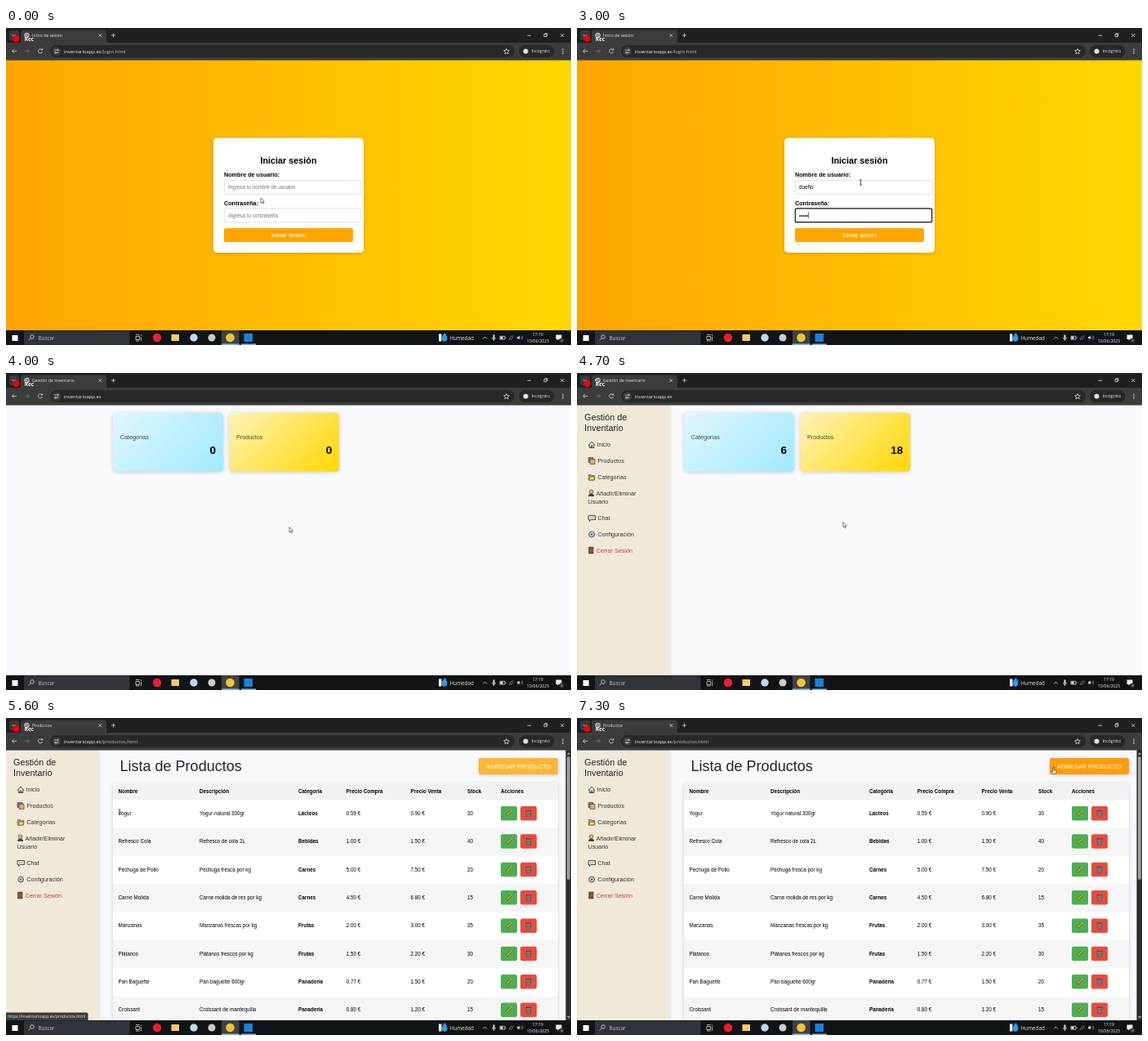
Recreate the animation shown at these times as an HTML page. Size 692x388 px, loop 8 s.

```html
<!DOCTYPE html>
<html lang="es">
<head>
<meta charset="utf-8">
<title>Inventario</title>
<style>
  html, body { margin: 0; width: 100%; height: 100%; overflow: hidden; background: #111; }
  svg { display: block; width: 100vw; height: 100vh; }
  text { white-space: pre; }
  .page text { font-family: "Liberation Sans", Arial, sans-serif; font-size: 7.21px; }
  .page .small { font-size: 6.31px; }
  .page .h2 { font-size: 10.81px; }
  .page .h1 { font-size: 18.02px; }
  .page .count { font-size: 13.5px; font-weight: 700; text-anchor: end; }
  .bold { font-weight: 700; }
  .mid { text-anchor: middle; }
  .ui text { font-family: "Open Sans", "Noto Sans", sans-serif; font-size: 5.15px; fill: #e8e8e8; }
  .ui .url { font-size: 5.9px; }
  .ui .bar { font-size: 6.3px; }
  .line { fill: none; stroke: #d8d8d8; stroke-width: .8; }
  .ink { fill: none; stroke: #222; stroke-width: .8; }
  .shadow { filter: drop-shadow(0 1.5px 2px rgba(0, 0, 0, .18)); }
</style>
</head>
<body>
<svg viewBox="0 0 692 388" preserveAspectRatio="none">
  <defs>
    <linearGradient id="gold"><stop stop-color="#ffa500"/><stop offset="1" stop-color="#ffd700"/></linearGradient>
    <linearGradient id="blueCard" gradientUnits="userSpaceOnUse" x1="146" y1="33" x2="250" y2="137">
      <stop stop-color="#e0f7ff"/><stop offset="1" stop-color="#a0e9ff"/></linearGradient>
    <linearGradient id="goldCard" gradientUnits="userSpaceOnUse" x1="289" y1="33" x2="393" y2="137">
      <stop stop-color="#fff3b8"/><stop offset="1" stop-color="#ffd700"/></linearGradient>
    <g id="edit">
      <rect width="20" height="17.5" rx="2" fill="#4caf50"/>
      <path d="M7 11.5 12 6.2" stroke="#5b4526" stroke-width="2.6"/>
      <path d="M7.3 11.2 11.6 6.6" stroke="#f0b429" stroke-width="1.4"/>
      <path d="M11.8 6.4 12.8 5.4" stroke="#e88a8a" stroke-width="2"/>
    </g>
    <g id="drop">
      <rect width="20" height="17.5" rx="2" fill="#e74c3c"/>
      <path d="M7 6h6l-.7 7H7.700z" fill="#8a9299" stroke="#3d4246" stroke-width=".6"/>
      <path d="M6.500 5.500h7M9 7v5M11 7v5" stroke="#3d4246" stroke-width=".7"/>
    </g>
  </defs>

  <g class="page" data-at="0 4000">
    <rect y="39" width="692" height="332" fill="url(#gold)"/>
    <rect class="shadow" x="254" y="134.500" width="184" height="140.500" rx="4.500" fill="#fff"/>
    <text class="h2 bold mid" x="346" y="166.300">Iniciar sesión</text>
    <text class="bold" x="267" y="182.300">Nombre de usuario:</text>
    <text class="bold" x="267" y="216.700">Contraseña:</text>
    <g id="user"></g>
    <g id="pass"></g>
    <rect x="267" y="245" width="158" height="17" rx="2" fill="#ffa500"/>
    <text class="mid" x="346" y="255.800" fill="#fff">Iniciar sesión</text>
  </g>

  <g class="page" data-at="4000 8000">
    <rect y="39" width="692" height="332" fill="#f7f9fd"/>
    <g data-at="4000 5500">
      <rect class="shadow" x="131" y="48.500" width="135" height="72" rx="4.500" fill="url(#blueCard)"/>
      <rect class="shadow" x="273.500" y="48.500" width="134.500" height="72" rx="4.500" fill="url(#goldCard)"/>
      <text x="139.700" y="81.200" fill="#444">Categorías</text>
      <text x="282" y="81.200" fill="#444">Productos</text>
      <text class="count" x="257" y="99" id="categories"></text>
      <text class="count" x="399.300" y="99" id="products"></text>
    </g>
    <g data-at="5500 8000">
      <text class="h1" x="139.500" y="65" fill="#212529">Lista de Productos</text>
      <rect class="shadow" id="add" x="579" y="49" width="97" height="20" rx="2"/>
      <text class="mid" x="627.500" y="61.500" fill="#fff">AGREGAR PRODUCTO</text>
      <rect class="shadow" x="131" y="79.500" width="545" height="300" fill="#fff"/>
      <rect x="131" y="79.500" width="545" height="21" fill="#f1f3f2"/>
      <g id="table"></g>
      <rect x="685.500" y="39" width="6.500" height="332" fill="#2c2c2c"/>
      <rect x="687" y="47" width="3.800" height="151" rx="1.900" fill="#9f9f9f"/>
      <path d="M687 45h4l-2-3zM687 365h4l-2 3z" fill="#9f9f9f"/>
    </g>
    <g data-at="4100 8000">
      <rect class="shadow" y="39" width="113" height="332" fill="#f0e9d7"/>
      <text class="h2" x="9" y="58" fill="#212529">Gestión de</text>
      <text class="h2" x="9" y="71" fill="#212529">Inventario</text>
      <rect data-at="5100 5500" x="9" y="97.500" width="95" height="19.500" rx="2" fill="#ffba0a"/>
      <g id="menu" fill="#333"></g>
      <path class="ink" d="M14 88.500 18 84l4 4.500M15.200 87.500v4h5.600v-4M17.200 91.500V89h1.600v2.500"/>
      <path d="M14 103.500h6v6h-6z" fill="#b86b4b" stroke="#333" stroke-width=".6"/>
      <path d="M16 105.500h6v6h-6z" fill="#d5b37c" stroke="#333" stroke-width=".6"/>
      <path d="M14.300 124.500h3l1 1h3v5.500h-7z" fill="#e9a51c" stroke="#333" stroke-width=".6"/>
      <path d="M14.300 131 16 127h6.200l-1.400 4z" fill="#ffd35c" stroke="#333" stroke-width=".6"/>
      <path d="M14 151q0-3.500 3.500-3.500T21 151z" fill="#444"/>
      <circle cx="17.500" cy="145.300" r="2.300" fill="#f0b84b" stroke="#5b3b1c" stroke-width=".7"/>
      <path class="ink" d="M14 174.500h8.400v5h-5.500l-1.500 2v-2H14zM16 177h.8M17.800 177h.8M19.600 177h.8"/>
      <circle cx="18" cy="197.500" r="3.300" fill="#d9dfe3" stroke="#4b555c" stroke-width="1.300" stroke-dasharray="1.700 .4"/>
      <circle cx="18" cy="197.500" r="1.200" fill="#4b555c"/>
      <path d="M14.500 213h5.500v8h-5.500z" fill="#8b4f2b" stroke="#333" stroke-width=".6"/>
      <circle cx="18.700" cy="217.200" r=".5" fill="#ffd35c"/>
    </g>
  </g>

  <g class="ui">
    <rect width="692" height="19" fill="#202020"/>
    <rect x="4" y="3" width="12" height="12" rx="3" fill="#3a3a3a"/>
    <path class="line" d="M7.500 8 9.500 10l2-2"/>
    <path d="M16 19q2 0 2-2V6q0-3.500 3.500-3.500h98q3.500 0 3.500 3.500v11q0 2 2 2z" fill="#3c3c3c"/>
    <rect y="18" width="692" height="21.500" fill="#3c3c3c"/>
    <g id="globe" class="line" stroke-width=".6"><circle cx="25.500" cy="9" r="2.900" fill="#777"/><path d="M22.800 8q2 0 2.700 1.500t2.500.5M25 6.200l1.200 1.500"/></g>
    <path id="spinner" class="line" d="M25.500 6.200a2.800 2.800 0 0 1 2.800 2.800"/>
    <text id="title" x="32" y="10.900"></text>
    <path class="line" d="m113.500 7.300 3.600 3.600m0-3.600-3.600 3.600M129 9h5M131.500 6.500v5M638.500 9.200h4.500M659 7.700h3v3h-3zM660 7.500v-.8h3v3h-.8M679.300 7l4 4m0-4-4 4"/>
    <path class="line" d="M13 28.300H7.500m2.500-2.500-2.500 2.500 2.500 2.500"/>
    <path class="line" d="M23 28.300h5.500M26 25.800l2.500 2.500-2.500 2.500" style="stroke:#777"/>
    <path id="reload" class="line" d="M44.300 26.800a2.600 2.600 0 1 0 .3 2.200M44.700 25v2h-2"/>
    <path id="stop" class="line" d="m40.200 26.200 4.200 4.200m0-4.200-4.200 4.200"/>
    <rect x="54" y="21" width="569" height="15" rx="7.500" fill="#282828"/>
    <circle cx="61.700" cy="28.500" r="5.300" fill="#3c3c3c"/>
    <path class="line" d="M59.200 27h2.500M59.200 30.200h1M62.300 30.200h2.200"/>
    <circle class="line" cx="63.400" cy="27" r=".9"/><circle class="line" cx="61" cy="30.200" r=".9"/>
    <text id="url" class="url" x="70.700" y="30.700"></text>
    <path class="line" d="m613 25.300 1 2.200 2.400.2-1.800 1.600.5 2.300-2.100-1.200-2.100 1.200.5-2.300-1.800-1.600 2.400-.2z"/>
    <rect x="628" y="21" width="43.500" height="15" rx="7.500" fill="#282828"/>
    <circle cx="636.500" cy="28.500" r="3" fill="#e3e3e3"/>
    <text x="643.700" y="30.400">Incógnito</text>
    <path d="M682 25.500v6" stroke="#ddd" stroke-width="1.300" stroke-dasharray="1.300 1"/>
    <circle cx="12.500" cy="13" r="4.200" fill="#f00000"/>
    <text class="bar bold" x="22.800" y="15.500" style="fill:#fff">Rec</text>

    <g data-at="5100 6100">
      <path d="M0 360.500h98.500q2 0 2 2V371H0z" fill="#3c3c3c"/>
      <text x="2" y="367.200" style="font-size:5.080px">https://inventarioapp.es/productos.html</text>
    </g>

    <rect y="370" width="692" height="18" fill="#111417"/>
    <rect x="7.500" y="376" width="7" height="7" fill="#fff"/>
    <rect x="22" y="370.500" width="129.500" height="17.500" fill="#303337"/>
    <circle class="line" cx="32" cy="378" r="2.300"/><path class="line" d="m30.300 379.700-2.800 2.800"/>
    <text class="bar" x="39.500" y="381.500" style="fill:#c4c4c4">Buscar</text>
    <path class="line" d="M159 377.500h4.500v4H159zM159 375.500h4.500M159 383h4.500M165.500 375.500v1.500M165.500 378v5"/>
    <rect x="264" y="370" width="21.500" height="18" fill="#3d4247"/>
    <path d="M264 387.300h21.500M288 387.300h18" stroke="#76b9ed" stroke-width="1.400"/>
    <circle cx="185" cy="379" r="5.200" fill="#f01d2b"/>
    <rect x="202.500" y="375" width="9.500" height="8" fill="#f6cd62"/>
    <circle cx="230" cy="379" r="4.700" fill="#bcd9ee"/>
    <circle cx="252" cy="379" r="4.500" fill="#c9cdd0"/>
    <circle cx="274.500" cy="379" r="5.300" fill="#f3c331"/>
    <rect x="291.500" y="374" width="10.500" height="10" fill="#1683e0"/>
    <path d="M530 374.500h3.500v9H530z" fill="#e8f2fb"/>
    <path d="M537.500 373q4.500 6.500 2 9.500t-5-.2 3-9.300z" fill="#2d9df0"/>
    <text class="bar" x="543.700" y="381.500">Humedad</text>
    <path class="line" d="m584 380.500 2.500-2.500 2.500 2.500M597.500 380v3M595.500 379q0 2.300 2 2.300t2-2.300M605 377.300h6v3.800h-6zM612 378.500v1.500"/>
    <path d="M596.500 375.500h2v4.500h-2zM605.500 377.700h3v3h-3zM626 378h1.300l1.700-1.500v5l-1.700-1.500H626z" fill="#ddd"/>
    <path class="line" d="M616.500 382q0-5 5-5M618.500 382q0-3 3-3M630.500 377.500q1.200 1.500 0 3M632 376.500q2 2.500 0 5" style="stroke:#888"/>
    <text class="mid" x="651.500" y="377">17:19</text>
    <text class="mid" x="651.500" y="385.200">10/06/2025</text>
    <path d="M673.500 375.500h7v5.500H677l-1.500 1.700V381h-2z" fill="#eee"/>
    <circle cx="680.500" cy="382.500" r="3" fill="#333"/>
    <text class="mid" x="680.500" y="384" style="font-size:4.200px">3</text>
  </g>

  <g id="pointer">
    <path id="arrow" d="M0 0v6.300l1.500-1.300 1 2.200 1-.5-1-2.100h2z" fill="#fff" stroke="#222" stroke-width=".6"/>
    <path id="beam" d="M-1.500 0h3M0 0v6M-1.500 6h3" fill="none" stroke="#222" stroke-width=".7"/>
    <path id="hand" d="M-.6 0h1.200v3l2.700.7v2.500L2.500 8H-.8L-2.500 5.300l.7-.6 1.200.9z" fill="#fff" stroke="#222" stroke-width=".6"/>
  </g>
</svg>

<script>
const LOOP = 8000, STEP = 100;
const $ = id => document.getElementById(id);
const show = (el, on) => { el.style.display = on ? '' : 'none'; };
const label = (x, y, s, cls = '', extra = '') => `<text x="${x}" y="${y}" class="${cls}" ${extra}>${s}</text>`;
// Value of the last [time, ...value] entry that has started.
const current = (list, t) => list.filter(e => e[0] <= t).pop();

const menu = [
  [24.5, 90, 'Inicio'], [25.3, 110, 'Productos'], [25.3, 130, 'Categorías'],
  [23.5, 149.5, 'Añadir/Eliminar'], [13.500, 160, 'Usuario'],
  [25.3, 180, 'Chat'], [25.3, 200, 'Configuración']
];
$('menu').innerHTML = menu.map(m => label(...m)).join('') +
  label(23.5, 219.600, 'Cerrar Sesión', '', 'fill="#dc3545"');

const columns = [137.5, 237, 358, 416.8, 495.500, 565, 606];
const heads = 'Nombre|Descripción|Categoría|Precio Compra|Precio Venta|Stock|Acciones'.split('|');
const goods = `Yogur|Yogur natural 300gr|Lácteos|0.59 €|0.90 €|30
Refresco Cola|Refresco de cola 2L|Bebidas|1.00 €|1.50 €|40
Pechuga de Pollo|Pechuga fresca por kg|Carnes|5.00 €|7.50 €|20
Carne Molida|Carne molida de res por kg|Carnes|4.50 €|6.80 €|15
Manzanas|Manzanas frescas por kg|Frutas|2.00 €|3.00 €|35
Plátanos|Plátanos frescos por kg|Frutas|1.50 €|2.20 €|30
Pan Baguette|Pan baguette 600gr|Panadería|0.77 €|1.50 €|20
Croissant|Croissant de mantequilla|Panadería|0.80 €|1.20 €|15`.split('\n').map(r => r.split('|'));

$('table').innerHTML = heads.map((h, i) => label(columns[i], 92.4, h, 'small bold')).join('') +
  goods.map((cells, row) => {
    const top = 100.2 + 34.35 * row;
    return `<rect x="131" y="${top}" width="545" height="34.35" fill="${row % 2 ? '#f5f5f5' : '#fff'}"/>` +
      cells.map((c, i) => label(columns[i], top + 18.8, c, i === 2 ? 'small bold' : 'small')).join('') +
      `<use href="#edit" x="606" y="${top + 7.8}"/><use href="#drop" x="630" y="${top + 7.8}"/>`;
  }).join('');

function makeField(group, y, hint) {
  group.innerHTML = `<rect x="267.300" y="${y}" width="167.400" height="16.800" rx="2" fill="#fff"/>` +
    label(272, y + 10.7, '', 'small') + `<path stroke="#111" stroke-width=".7"/>`;
  const [box, text, caret] = group.children;
  return (value, focused) => {
    text.textContent = value || hint;
    text.setAttribute('fill', value ? '#000' : '#757575');
    box.setAttribute('stroke', focused ? '#101010' : '#ccc');
    box.setAttribute('stroke-width', focused ? 1.2 : .6);
    const x = 272.3 + (value ? text.getComputedTextLength() : 0);
    caret.setAttribute('d', `M${x} ${y + 4.500}v7.500`);
    show(caret, focused);
  };
}
const drawUser = makeField($('user'), 186.500, 'Ingresa tu nombre de usuario');
const drawPass = makeField($('pass'), 220.900, 'Ingresa tu contraseña');

const userKeys = [[0, 0], [800, 1], [1000, 3], [1100, 4], [1200, 5]];
const passKeys = [[0, 0], [2000, 1], [2100, 2], [2500, 3], [2800, 4], [3000, 5], [3100, 6], [3300, 7], [3700, 9]];
const tabs = [
  [0, 'Inicio de sesión', 'inventarioapp.es/login.html'],
  [3800, 'inventarioapp.es', 'inventarioapp.es'],
  [4000, 'Gestión de Inventario', 'inventarioapp.es'],
  [5500, 'Productos', 'inventarioapp.es/productos.html']
];
const shapes = [[0, 'arrow'], [700, 'beam'], [3800, 'arrow'], [5100, 'hand'], [5500, 'arrow'],
  [5600, 'beam'], [5700, 'arrow'], [7300, 'hand']];
const path = [
  [0, 312, 208], [600, 312, 208], [700, 347.5, 186], [3700, 347.5, 186], [3800, 347, 188.500],
  [4600, 347, 188.500], [5200, 63, 107.500], [5400, 63, 107.500], [5600, 139, 112], [6200, 198, 122],
  [6300, 198, 122], [6400, 237, 122], [7000, 237, 122], [7300, 583.500, 60.500], [LOOP, 583.500, 60.500]
];

function pointerAt(t) {
  const i = path.findIndex(p => p[0] > t), [t0, x0, y0] = path[i - 1], [t1, x1, y1] = path[i];
  const u = (t - t0) / (t1 - t0), k = u * u * (3 - 2 * u);
  return [x0 + (x1 - x0) * k, y0 + (y1 - y0) * k];
}

const timed = [...document.querySelectorAll('[data-at]')].map(el => [el, ...el.dataset.at.split(' ').map(Number)]);

function draw(t) {
  for (const [el, from, to] of timed) show(el, t >= from && t < to);
  if (t < 4000) {
    drawUser('dueño'.slice(0, current(userKeys, t)[1]), t >= 700 && t < 1900);
    drawPass('•'.repeat(current(passKeys, t)[1]), t >= 1900 && t < 3800);
  }
  const counted = t >= 4200;
  $('categories').textContent = counted ? 6 : 0;
  $('products').textContent = counted ? 18 : 0;
  $('add').setAttribute('fill', t >= 7300 ? '#ff9c08' : '#ffb733');

  const [, title, url] = current(tabs, t);
  $('title').textContent = title;
  $('url').innerHTML = url.replace(/\/.*/, '<tspan fill-opacity=".8">$&</tspan>');
  const loading = (t >= 3800 && t < 4000) || (t >= 5300 && t < 5500);
  for (const id of ['stop', 'spinner']) show($(id), loading);
  for (const id of ['reload', 'globe']) show($(id), !loading);
  $('spinner').setAttribute('transform', `rotate(${t * .4} 25.5 9)`);

  $('pointer').setAttribute('transform', `translate(${pointerAt(t)})`);
  const shape = current(shapes, t)[1];
  for (const id of ['arrow', 'beam', 'hand']) show($(id), id === shape);
}

let last = -1;
const start = performance.now();
function tick() {
  const t = Math.floor(((performance.now() - start) % LOOP) / STEP) * STEP;
  if (t !== last) draw(last = t);
  requestAnimationFrame(tick);
}
tick();
</script>
</body>
</html>
```
